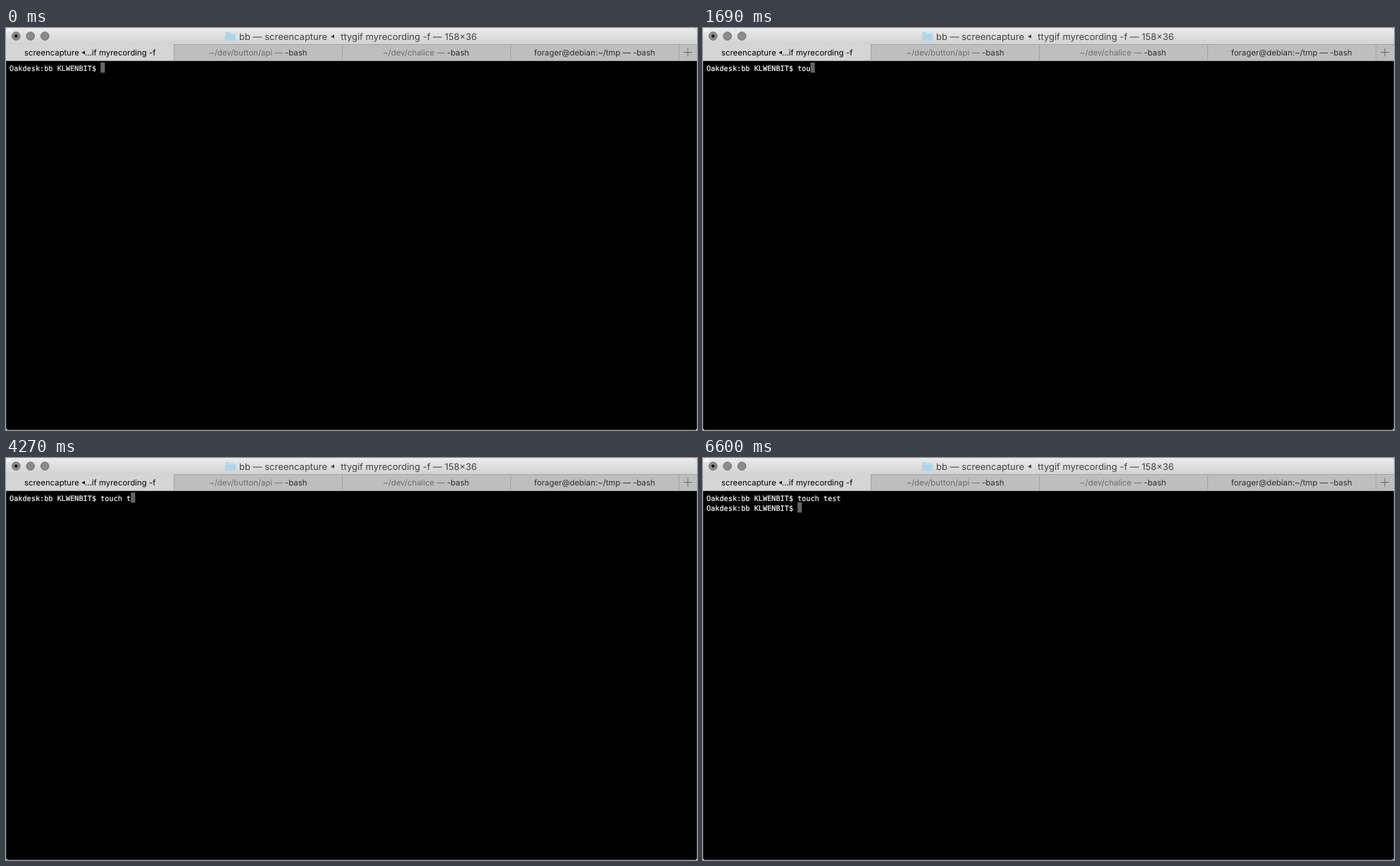
An HTML page for the animation above (8000 ms loop, 981 by 571 pixels).

```html
<!DOCTYPE html>
<html lang="en">
<head>
<meta charset="utf-8">
<title>Terminal</title>
<style>
  html, body { margin: 0; width: 100%; height: 100%; overflow: hidden; background: #fff; }
  svg { display: block; width: 981px; height: 571px; }
  text { white-space: pre; text-rendering: geometricPrecision; }
  .title { font: 13px Inter, "Open Sans", sans-serif; fill: #434343; }
  .tab { font: 11.4px Inter, "Open Sans", sans-serif; fill: #2e2e2e; }
  .active { fill: #000; }
  .path { fill: #6d6d6d; }
  .end { text-anchor: end; }
  .mono { font: 10.22px "DejaVu Sans Mono", monospace; fill: #fff; stroke: #fff; stroke-width: .2px; }
</style>
</head>
<body>
<svg viewBox="0 0 981 571">
  <defs>
    <linearGradient id="bar" x2="0" y2="1">
      <stop stop-color="#ebebeb"/>
      <stop offset="1" stop-color="#d2d2d2"/>
    </linearGradient>
    <clipPath id="window"><rect width="981" height="571" rx="4"/></clipPath>
  </defs>
  <g clip-path="url(#window)">
    <rect width="981" height="571"/>
    <path d="M.5 47V570.5H980.5V47" fill="none" stroke="#262626"/>

    <rect width="981" height="23" fill="url(#bar)"/>
    <rect width="8" height="5" fill="#f2f2f2"/>
    <g fill="#8b8b8d" stroke="#6c6c6e">
      <circle cx="14.3" cy="11.5" r="5.8"/>
      <circle cx="34.7" cy="11.5" r="5.8"/>
      <circle cx="55.2" cy="11.5" r="5.8"/>
    </g>
    <circle cx="14.3" cy="11.5" r="2.2" fill="#111"/>
    <path d="M311 6h5l1.5 1.5H326V18H311z" fill="#a9d6ea"/>
    <path d="M311 9h15" stroke="#bfe3f2"/>
    <text class="title" x="331" y="16.5">bb — screencapture</text>
    <path d="M466 9.3v5.4l-5-2.7z" fill="#434343"/>
    <text class="title end" x="668.5" y="16.5">ttygif myrecording -f — 158×36</text>

    <rect y="23" width="981" height="24" fill="#bebebe"/>
    <rect y="23" width="238" height="24" fill="#d5d5d5"/>
    <path d="M238 23.5H981M0 46.5H981M238.5 23V47M477.5 23V47M716.5 23V47M955.5 23V47" stroke="#a3a3a3"/>
    <path d="M962 34.5h12M968 28.5v12" stroke="#686868"/>
    <text class="tab active" x="26" y="38.8">screencapture</text>
    <path d="M112 32.5v5l-4.5-2.5z"/>
    <text class="tab active end" x="212.5" y="38.8">…if myrecording -f</text>
    <text class="tab end" x="427.5" y="38.8"><tspan class="path">~/dev/button/api — </tspan>-bash</text>
    <text class="tab end" x="657.5" y="38.8"><tspan class="path">~/dev/chalice — </tspan>-bash</text>
    <text class="tab end" x="921.5" y="38.8">forager@debian:~/tmp — -bash</text>

    <rect id="cursor" width="6.15" height="14.5" fill="#646464"/>
    <text class="mono" id="line0" x="5" y="60.9"></text>
    <text class="mono" id="line1" x="5" y="74.9"></text>
  </g>
</svg>
<script>
  const LOOP = 8000, CELL = 6.153, LEFT = 5, TOP = 49, ROW = 14;
  const PROMPT = 'Oakdesk:bb KLWENBIT$ ';
  const COMMAND = 'touch test';
  const keyTimes = [1560, 1620, 1690, 1840, 1920, 3180, 4270, 4380, 4500, 4610];
  const ENTER = 6500, RETURN = 6600;

  const lines = [0, 1].map(i => document.getElementById('line' + i));
  const cursor = document.getElementById('cursor');

  function draw(t) {
    const typed = keyTimes.filter(k => k <= t).length;
    const rows = [
      PROMPT + COMMAND.slice(0, typed),
      t >= RETURN ? PROMPT : ''
    ];
    const row = t >= ENTER ? 1 : 0;
    lines.forEach((line, i) => { line.textContent = rows[i]; });
    lines[0].style.fill = t < 880 ? '#e8e8e8' : '#fff';
    cursor.setAttribute('x', LEFT + rows[row].length * CELL);
    cursor.setAttribute('y', TOP + row * ROW);
  }

  const start = performance.now();
  function tick() {
    draw((performance.now() - start) % LOOP);
    requestAnimationFrame(tick);
  }
  tick();
</script>
</body>
</html>
```
